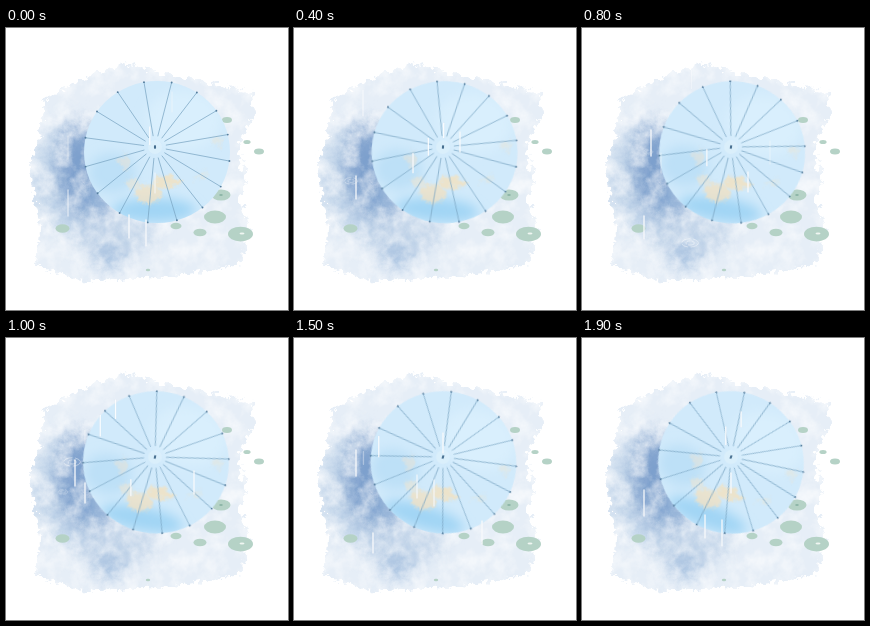
These frames come from a looping animation (282x282 px, 2 s). An HTML page:

```html
<!DOCTYPE html>
<html lang="en">
<head>
<meta charset="utf-8">
<title>Umbrella in the rain</title>
<style>
  html, body { margin: 0; width: 100%; height: 100%; overflow: hidden; background: #fff; }
  svg { position: absolute; inset: 0; width: 100%; height: 100%; }
  #umbrella { transform-origin: 149px 119px; }
</style>
</head>
<body>
<svg viewBox="0 0 282 282">
  <defs>
    <filter id="wash" filterUnits="userSpaceOnUse" x="0" y="0" width="282" height="282" color-interpolation-filters="sRGB">
      <feTurbulence type="fractalNoise" baseFrequency=".16" numOctaves="4" seed="4" result="ragged"/>
      <feDisplacementMap in="SourceGraphic" in2="ragged" scale="14" xChannelSelector="R" yChannelSelector="G" result="paint"/>
      <feTurbulence type="fractalNoise" baseFrequency=".06" numOctaves="5" seed="9"/>
      <feColorMatrix values="0 0 0 0 1  0 0 0 0 1  0 0 0 0 1  1.3 0 0 0 -.5"/>
      <feComposite in2="paint" operator="in" result="mottle"/>
      <feMerge><feMergeNode in="paint"/><feMergeNode in="mottle"/></feMerge>
    </filter>
    <filter id="soft" x="-80%" y="-80%" width="260%" height="260%"><feGaussianBlur stdDeviation="9"/></filter>
    <clipPath id="blot"><use href="#blotShape"/></clipPath>
  </defs>
  <g filter="url(#wash)">
    <path id="blotShape" fill="#e6eef7" d="M40 70L85 47 122 35 158 46 246 64 248 85 232 122 241 152 233 172 242 200 236 236 165 248 80 254 30 238 34 195 23 140 33 108Z"/>
    <g clip-path="url(#blot)"><g id="shade" filter="url(#soft)"></g></g>
  </g>
  <g id="pads"></g>
</svg>

<svg viewBox="0 0 282 282">
  <defs>
    <filter id="blur" x="-80%" y="-80%" width="260%" height="260%"><feGaussianBlur stdDeviation="6"/></filter>
    <filter id="dab" x="-30%" y="-30%" width="160%" height="160%" color-interpolation-filters="sRGB">
      <feGaussianBlur stdDeviation="1.6" result="smooth"/>
      <feTurbulence type="fractalNoise" baseFrequency=".12" numOctaves="3" seed="6"/>
      <feDisplacementMap in="smooth" scale="13" xChannelSelector="R" yChannelSelector="G"/>
    </filter>
    <clipPath id="disc"><use href="#canopy"/></clipPath>
  </defs>
  <g id="umbrella">
    <ellipse id="canopy" cx="151" cy="124" rx="73" ry="71" fill="#d1eafb"/>
    <g clip-path="url(#disc)">
      <g id="tint" filter="url(#blur)"></g>
      <g id="dabs" filter="url(#dab)"></g>
    </g>
    <g id="ribs"></g>
    <circle cx="149" cy="119" r="7" fill="#e0f1fc" opacity=".6"/>
    <ellipse cx="149" cy="119" rx="1.1" ry="2" fill="#426b8d"/>
  </g>
  <g id="ripples" fill="none" stroke="#fff" stroke-width=".9" stroke-linecap="round"></g>
  <g id="rain" stroke-linecap="round"></g>
</svg>

<script>
const LOOP = 2000, STEPS = 20, FALL = 0.1;
const $ = id => document.getElementById(id);
const scatter = (i, ratio) => (i * ratio) % 1;

const oval = (x, y, rx, ry, fill, alpha = 1) =>
  `<ellipse cx="${x}" cy="${y}" rx="${rx}" ry="${ry}" fill="${fill}" opacity="${alpha}"/>`;

// Every motion advances in the same ten steps per second.
const play = (el, frames, start = 0) => el.animate(frames, {
  duration: LOOP, delay: start && start - LOOP, iterations: Infinity, easing: `steps(${STEPS})`
});

function add(parent, markup) {
  parent.insertAdjacentHTML('beforeend', markup);
  return parent.lastElementChild;
}

$('shade').innerHTML =
  oval(66, 150, 38, 55, '#b7cde6', .8) +
  oval(72, 140, 19, 45, '#7c9fcc') +
  oval(88, 175, 20, 18, '#84a7d1', .8) +
  oval(108, 205, 42, 18, '#bacfe7', .8) +
  oval(103, 228, 17, 8, '#8fb1d8');

const pads = [[221, 92, 5], [241, 114, 3.6], [253, 123.5, 5], [215, 167, 9.5], [209, 189, 11],
  [234.5, 206, 12.5], [194, 204.5, 6.5], [170, 198, 5.5], [56.5, 200.5, 7], [142, 242, 2.2]];
$('pads').innerHTML = pads.map(([x, y, r]) => oval(x, y, r, r * .59, '#b5d2c6')).join('') +
  oval(236, 205.5, 2.5, 1, '#f0f6f2') + oval(215, 167, 1.8, .9, '#8db5a6');

$('tint').innerHTML =
  oval(178, 92, 38, 30, '#d9effd') +
  oval(106, 145, 24, 20, '#b6dcf6', .75) +
  oval(148, 182, 42, 12, '#9cd3f4', .9);

$('dabs').innerHTML =
  oval(160, 154, 14, 6, '#f1e2c2', .85) +
  oval(142, 166, 13, 9, '#f0e1c4', .8) +
  oval(127, 156, 8, 5, '#ebe4d2', .6) +
  oval(118, 134, 6, 7, '#dfe3dd', .7) +
  oval(212, 113, 4, 6, '#e4e6de', .6) +
  oval(196, 147, 5, 5, '#e3e6de', .6);

// Sixteen ribs, bunched slightly toward the lower right.
const RIBS = 16;
for (let k = 0; k < RIBS; k++) {
  const lean = 3 * Math.cos((k + 2) * 2 * Math.PI / RIBS) - 1.8;
  const a = (k * 360 / RIBS - 78.75 + lean) * Math.PI / 180;
  const x = 151 + 73 * Math.cos(a), y = 124 + 71 * Math.sin(a);
  const dx = x - 149, dy = y - 119, inner = 11 / Math.hypot(dx, dy);
  add($('ribs'), `<path d="M${149 + dx * inner} ${119 + dy * inner}L${x} ${y}" stroke="#7ba6c3" stroke-width=".75"/>`);
  add($('ribs'), `<circle cx="${x}" cy="${y}" r=".95" fill="#557e9e"/>`);
}
play($('umbrella'), [{ transform: 'rotate(0deg)' }, { transform: `rotate(${360 / RIBS}deg)` }]);

function drop(x, top, start, length, life) {
  const line = `<path d="M${x} ${top}v${length}"`;
  const el = add($('rain'), `<g>${line} stroke="#aebfd6" stroke-opacity=".2" stroke-width="1.7"/>` +
    `${line} stroke="#fff" stroke-opacity=".9" stroke-width="1.3"/></g>`);
  const end = life / LOOP, landed = `translateY(${FALL * life}px)`;
  play(el, [
    { offset: 0, opacity: .4, transform: 'translateY(0px)' },
    { offset: end * .15, opacity: 1 },
    { offset: end * .85, opacity: 1 },
    { offset: end, opacity: 0, transform: landed },
    { offset: 1, opacity: 0, transform: landed }
  ], start);
}

// Leading drops: x, top, start. Short-lived ones are scattered around them.
[[166, 64, 0], [62, 108, 0], [69, 52, 300], [79, 125, 800], [188, 113, 800],
  [62, 72, 1100], [149, 55, 1100], [123, 127, 1400], [140, 132, 1400]]
  .forEach(([x, top, start], i) => drop(x, top, start, 20 + i % 3 * 3, 1000));

for (let i = 1; i <= 11; i++) {
  drop(60 + 105 * scatter(i, .618), 40 + 95 * scatter(i, .755), i * 700 % LOOP, 12 + 10 * scatter(i, .414), 400);
}

function ripple(x, y, start) {
  const el = add($('ripples'), `<g transform="translate(${x} ${y})"><g>
    <ellipse rx="12" ry="6" stroke-dasharray="13 5 8 4"/><ellipse rx="6" ry="3" stroke-dasharray="9 3"/></g></g>`);
  play(el.firstElementChild, [
    { offset: 0, opacity: .9, transform: 'scale(.25)' },
    { offset: .15, opacity: .8 },
    { offset: .25, opacity: 0, transform: 'scale(1)' },
    { offset: 1, opacity: 0, transform: 'scale(1)' }
  ], start);
}
[[57, 153, 200], [57, 154, 900], [66, 124, 700], [85, 159, 1000], [108, 215, 500]]
  .forEach(spot => ripple(...spot));
</script>
</body>
</html>
```
